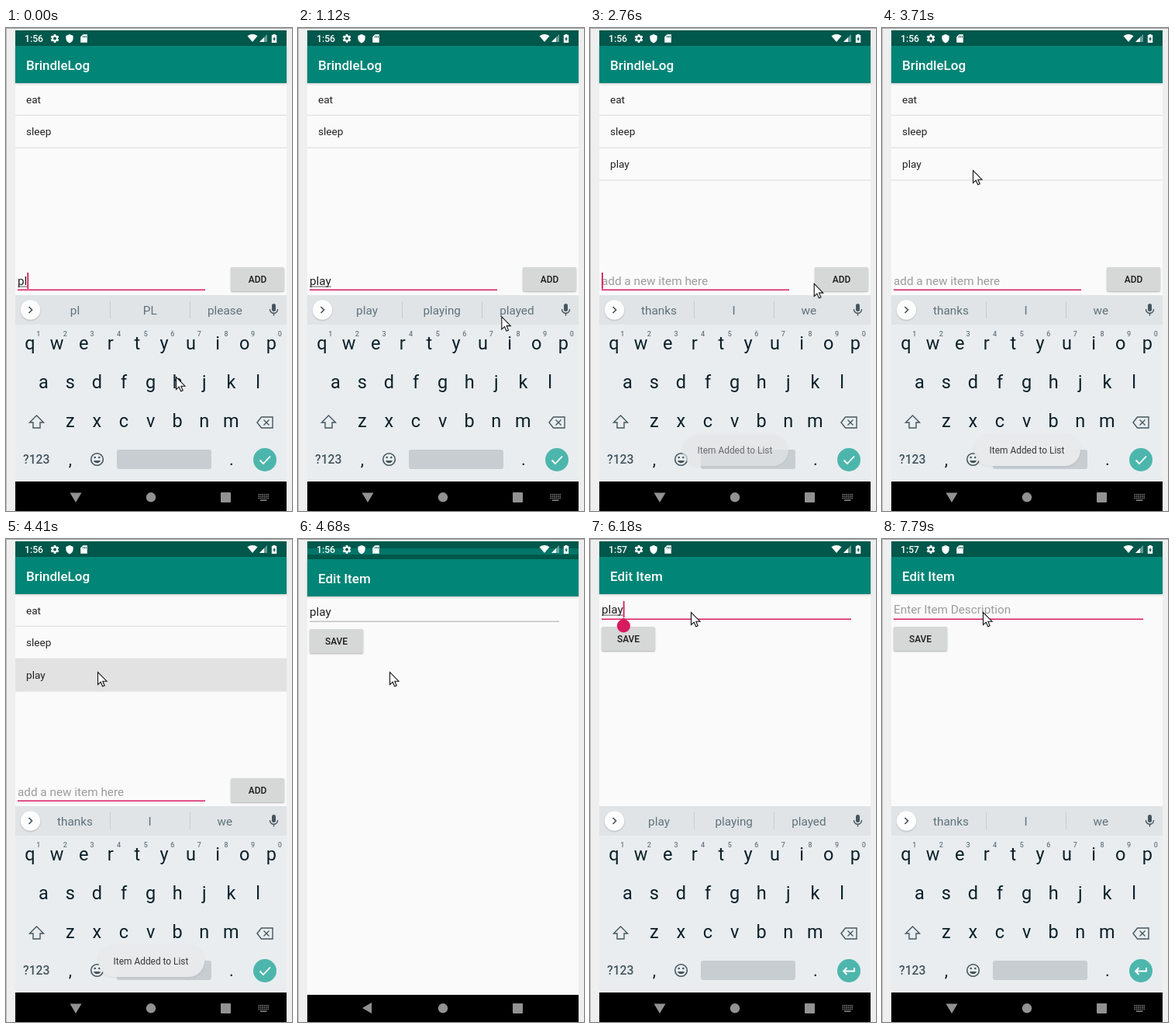
Animation of 369x622 px, one loop 8000 ms. Source, as an HTML page with a canvas:

```html
<!DOCTYPE html>
<html lang="en">
<head>
<meta charset="utf-8">
<title>Todo app demo</title>
<style>
  html, body { margin: 0; width: 100%; height: 100%; overflow: hidden; background: #efefef; }
  canvas { display: block; width: 369px; height: 622px; }
</style>
</head>
<body>
<canvas id="stage" width="369" height="622"></canvas>
<script>
const ctx = document.getElementById('stage').getContext('2d');
const LOOP = 8000;
const PINK = '#d81b60', TEAL = '#008577', DARK_TEAL = '#00574b', PAPER = '#fafafa', KEY = '#0b2029', SLATE = '#45565f';

// The screen is refreshed in bursts: [start, end, steps].
const bursts = [
  [0, 0, 1], [130, 130, 1], [410, 410, 1], [970, 1820, 7], [2070, 3040, 8], [3190, 3710, 5],
  [4140, 5070, 8], [5200, 6180, 8], [6460, 7390, 8], [7790, 7790, 1]
];
const ticks = bursts.flatMap(([a, b, n]) =>
  Array.from({ length: n }, (_, i) => n > 1 ? a + (b - a) * i / (n - 1) : a));

// Pointer path: [time, x, y].
const path = [
  [0, 219, 449], [830, 219, 449], [1110, 262, 372], [1390, 317, 277], [1530, 322, 294], [1820, 323, 325],
  [2360, 323, 325], [2630, 288, 329], [3040, 154, 314], [3320, 128, 250], [3580, 118, 193], [3710, 117, 183],
  [4140, 118, 175], [4280, 118, 171], [5070, 118, 171], [5480, 127, 104], [5620, 129, 94], [5900, 129, 94],
  [6030, 130, 94], [8000, 130, 94]
];

const suggestions = {
  pl: ['pl', 'PL', 'please'], pla: ['pla', 'play', 'place'], play: ['play', 'playing', 'played'],
  p: ['p', 'P', 'pm'], '': ['thanks', 'I', 'we']
};

const within = (t, a, b) => t >= a && t < b;
const latest = (t, list) => list.filter(([at]) => at <= t).pop()[1];

function pointer(t) {
  const i = Math.max(1, path.findIndex(p => p[0] >= t));
  const [a, x, y] = path[i - 1], [b, x2, y2] = path[i];
  const k = (t - a) / (b - a);
  return [x + (x2 - x) * k, y + (y2 - y) * k];
}

function rect(x, y, w, h, color) {
  ctx.fillStyle = color;
  ctx.fillRect(x, y, w, h);
}

function pill(x, y, w, h, r, color) {
  ctx.fillStyle = color;
  ctx.beginPath();
  ctx.roundRect(x, y, w, h, r);
  ctx.fill();
}

function disc(x, y, r, color) {
  ctx.fillStyle = color;
  ctx.beginPath();
  ctx.arc(x, y, r, 0, 7);
  ctx.fill();
}

function shape(d, x, y, fill, stroke, width = 1.4) {
  ctx.save();
  ctx.translate(x, y);
  const p = new Path2D(d);
  if (fill) { ctx.fillStyle = fill; ctx.fill(p, 'evenodd'); }
  if (stroke) { ctx.strokeStyle = stroke; ctx.lineWidth = width; ctx.stroke(p); }
  ctx.restore();
}

function label(s, x, y, size, color, weight = 400, align = 'left') {
  ctx.font = `${weight} ${size}px Roboto, sans-serif`;
  ctx.textAlign = align;
  ctx.fillStyle = color;
  ctx.fillText(s, x, y);
  return ctx.measureText(s).width;
}

function shadowed(blur, dy, alpha, draw) {
  ctx.save();
  ctx.shadowColor = `rgba(0,0,0,${alpha})`;
  ctx.shadowBlur = blur;
  ctx.shadowOffsetY = dy;
  draw();
  ctx.restore();
}

function button(text, x, y, ripple = 0) {
  shadowed(2, 1, .3, () => pill(x, y, 69, 31, 2, ripple ? '#cecfcf' : '#d6d7d7'));
  if (ripple) {
    ctx.save();
    ctx.beginPath();
    ctx.rect(x, y, 69, 31);
    ctx.clip();
    disc(x + 33, y + 15.5, ripple, '#c0c1c1');
    ctx.restore();
  }
  label(text, x + 34.5, y + 20, 11.9, '#1c1c1c', 500, 'center');
}

function field(text, hint, baseline, { caret, composing }) {
  if (!text) label(hint, 15, baseline, 15.3, '#9c9c9c');
  const w = text ? label(text, 15, baseline, 15.3, '#222') : 0;
  if (composing && text) rect(15, baseline + 1.6, w, .9, '#444');
  if (caret) rect(15 + w, baseline - 16, 1.8, 21, PINK);
  return 15 + w;
}

function statusBar(clock) {
  label(clock, 24, 18, 12.2, '#fff', 500);
  ctx.save();
  ctx.translate(63, 13.5);
  for (let i = 0; i < 3; i++) { rect(-1.4, -5.4, 2.8, 10.8, '#fff'); ctx.rotate(Math.PI / 3); }
  ctx.restore();
  disc(63, 13.5, 3.9, '#fff');
  disc(63, 13.5, 1.9, DARK_TEAL);
  shape('M0-5.5L4.6-3.5V0C4.6 3 2.5 5 0 6C-2.5 5-4.6 3-4.6 0V-3.5Z', 82, 13.5, '#fff');
  shape('M-1-5.3H4.3V5.3H-4.3V-2ZM-1.5-3.5V-1H-.6V-3.5ZM.6-3.5V-1H1.5V-3.5ZM2.4-3.5V-1H3.3V-3.5Z', 100.5, 13.5, '#fff');
  shape('M0 5L-6.5-2.8Q0-7 6.5-2.8Z', 318, 13, '#fff');
  shape('M5-5V5H-5Z', 332, 13, 'rgba(255,255,255,.4)');
  shape('M1-1V5H-5Z', 332, 13, '#fff');
  shape('M-1.5-5.5H1.5V-4.5H3.2V5.5H-3.2V-4.5H-1.5ZM.6-2.8L-1.8 1.2H-.3V4L2 0H.6Z', 346, 13.5, '#fff');
}

function appBar(title) {
  rect(12, 3, 350, 20, DARK_TEAL);
  shadowed(3, 1, .2, () => rect(12, 23, 350, 48, TEAL));
  label(title, 26, 53.5, 17, '#fff', 500);
}

function navBar(withKeyboard, top = 584) {
  rect(12, top, 350, 622 - top, '#000');
  const gray = '#929292';
  shape(withKeyboard ? 'M-7.5-5.5H7.5L0 7Z' : 'M-7 0L5-7V7Z', 90, 604, gray);
  disc(187, 604.3, 6.2, gray);
  pill(277, 598, 13, 13, 1, gray);
  if (!withKeyboard) return;
  for (let r = 0; r < 3; r++)
    for (let c = 0; c < 6; c++) rect(325.5 + c * 2.4, 600 + r * 2.4, 1.4, 1.4, gray);
  rect(328, 607.5, 8.5, 1.4, gray);
}

function keyRow(keys, x, y) {
  [...keys].forEach((k, i) => label(k, x + i * 34.6, y, 23.5, KEY, 400, 'center'));
}

function keyboard(words, enter, drop = 0) {
  ctx.save();
  ctx.beginPath();
  ctx.rect(12, 344, 350, 240);
  ctx.clip();
  ctx.translate(0, drop);
  rect(12, 344, 350, 240, '#e9edf0');
  rect(12, 344, 350, 38, '#e0e4e7');
  shadowed(2, 1, .2, () => disc(31.5, 363, 12.7, '#fdfdfd'));
  shape('M-2-4L2 0L-2 4', 31.5, 363, null, SLATE, 1.7);
  words.forEach((w, i) => label(w, 89 + i * 96.7, 369, 15.3, '#5f727b', 400, 'center'));
  rect(134, 352, 1, 22, '#c5cbcf');
  rect(237, 352, 1, 22, '#c5cbcf');
  pill(343, 355, 5, 10, 2.5, SLATE);
  shape('M-5-1C-5 6 5 6 5-1M0 4V7.5', 345.5, 363, null, SLATE, 1.4);

  keyRow('qwertyuiop', 31, 414);
  [...'1234567890'].forEach((d, i) => label(d, 41.8 + i * 34.6, 397, 9, '#68777f', 500, 'center'));
  keyRow('asdfghjkl', 48.3, 464);
  keyRow('zxcvbnm', 82.8, 514);
  shape('M0-8L9 1H4.5V8H-4.5V1H-9Z', 39.5, 507, null, SLATE);
  shape('M-10 0L-4.5-7H10V7H-4.5ZM-1.5-3.5L5.5 3.5M5.5-3.5L-1.5 3.5', 334, 508, null, SLATE);

  label('?123', 22, 561, 15.7, SLATE, 500);
  label(',', 83, 563, 22, KEY, 400, 'center');
  label('.', 291, 563, 22, KEY, 400, 'center');
  shape('M7.8 0A7.8 7.8 0 1 1-7.8 0A7.8 7.8 0 1 1 7.8 0', 117.5, 555.5, null, SLATE, 1.6);
  shape('M-4.5 1.5H4.5C3 5.8-3 5.8-4.5 1.5Z', 117.5, 555.5, SLATE);
  disc(114.7, 553, 1.3, SLATE);
  disc(120.3, 553, 1.3, SLATE);
  pill(143, 543, 122, 25, 3, '#c8cdd1');
  disc(334, 556, 15, '#4db6ac');
  shape(enter ? 'M7-4.5V0H-6.5M-2.5-4.5L-7 0L-2.5 4.5' : 'M-6.5 0L-2 4.5L7-5', 334, 556.5, null, '#fff', 1.8);
  ctx.restore();
}

function toast(alpha) {
  if (alpha <= 0) return;
  ctx.save();
  ctx.globalAlpha = alpha;
  shadowed(3, 1, .07, () => pill(119, 523, 137, 41, 20.5, '#e9ebec'));
  label('Item Added to List', 187, 548, 11.9, '#333', 400, 'center');
  ctx.restore();
}

function listScreen(t) {
  rect(12, 71, 350, 513, PAPER);
  appBar('BrindleLog');
  const added = t >= 2200;
  if (within(t, 4260, 4660)) rect(12, 154.5, 350, 41, '#e2e2e2');
  ['eat', 'sleep', 'play'].slice(0, added ? 3 : 2).forEach((item, i) => {
    const y = 111.8 + i * 41.85;
    label(item, 26, y - 15.2, 13.6, '#222');
    rect(12, y, 350, .9, '#d8d8d8');
  });
  const text = latest(t, [[0, 'pl'], [130, 'pla'], [410, 'play'], [2200, '']]);
  const caret = t < 970 || within(t, 1530, 2070) || within(t, 2200, 2700) || within(t, 3190, 3710);
  field(text, 'add a new item here', 331, { caret, composing: true });
  rect(15, 336.5, 242, 1.5, PINK);
  button('ADD', 290, 308, within(t, 2070, 2200) ? 27 : within(t, 2200, 2340) ? 38 : 0);
  return suggestions[text];
}

function editScreen(t, shift) {
  ctx.save();
  ctx.translate(0, shift);
  rect(12, 71, 350, 516, PAPER);
  appBar('Edit Item');
  const focused = t >= 5750;
  const text = latest(t, [[0, 'play'], [6460, 'pla'], [6720, 'pl'], [6980, 'p'], [7250, '']]);
  const x = field(text, 'Enter Item Description', 96, { caret: focused && t < 7790, composing: t >= 6030 });
  rect(15, 102.5, 322, 1.5, focused ? PINK : '#c3c3c3');
  button('SAVE', 15, 113);
  if (within(t, 5750, 6460)) {
    ctx.globalAlpha = t < 5890 ? .4 : t < 6030 ? .75 : 1;
    shape('M0-10.5L6.2-6A8.6 8.6 0 1 1-6.2-6Z', x + .6, 112, PINK);
  }
  ctx.restore();
  if (shift) {
    rect(12, 3, 350, shift, DARK_TEAL);
    rect(12, 12, 350, 8, '#007568');
  }
}

function draw(t) {
  rect(0, 0, 369, 622, '#efefef');
  rect(0, 0, 1, 622, '#b8b8b8');
  rect(0, 0, 369, 1, '#a8a8a8');

  if (t < 4530) {
    const words = listScreen(t);
    keyboard(words, false);
    navBar(true);
    toast(t < 2480 ? 0 : Math.min(1, (t - 2350) / 400) * .97);
  } else {
    const shift = t < 4660 ? 14 : t < 4790 ? 3 : 0;
    if (t < 4660) {
      listScreen(t);
      ctx.globalAlpha = .8;
    }
    editScreen(t, shift);
    ctx.globalAlpha = 1;
    const open = t >= 6030;
    if (open) {
      const typed = latest(t, [[0, 'play'], [6590, 'pla'], [6850, 'pl'], [7120, 'p'], [7390, '']]);
      keyboard(suggestions[typed], true, t < 6180 ? 40 : 0);
    }
    navBar(open, 584 + Math.min(shift, 3));
  }
  statusBar(t < 4930 ? '1:56' : '1:57');
  shape('M.5.5V16.5L4.2 13.2L6.7 18.8L9.2 17.7L6.8 12.2H12Z', ...pointer(t), '#fff', '#111', 1.1);
}

function frame(now) {
  const t = now % LOOP;
  draw(ticks.filter(k => k <= t).pop() ?? 0);
  requestAnimationFrame(frame);
}
requestAnimationFrame(frame);
</script>
</body>
</html>
```
